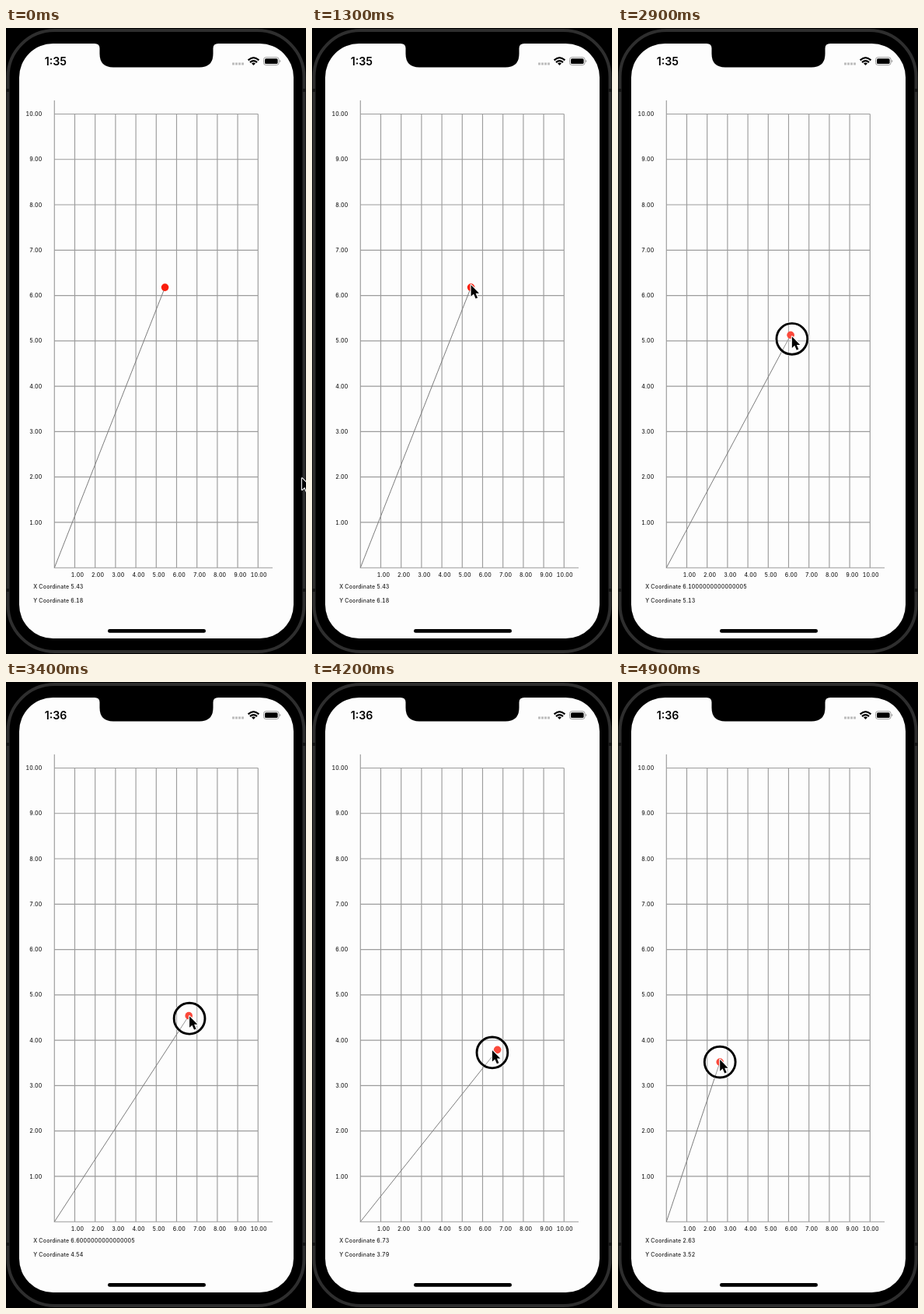
Recreate the animation shown at these times as an HTML page. Size 386x804 px, loop 5 s.

```html
<!DOCTYPE html>
<html lang="en">
<head>
<meta charset="utf-8">
<title>Draggable point</title>
<style>
  html, body { margin: 0; width: 100%; height: 100%; overflow: hidden; background: #000; }
  svg { display: block; width: 100vw; height: 100vh; }
  text { font: 500 7px Inter, Roboto, sans-serif; font-variant-numeric: tabular-nums; letter-spacing: .2px; fill: #1c1c1c; }
  .end { text-anchor: end; }
  #clock { font-size: 14.2px; font-weight: 600; font-variant-numeric: normal; letter-spacing: 0; fill: #000; }
</style>
</head>
<body>
<svg viewBox="0 0 386 804">
  <!-- phone body -->
  <rect width="386" height="804"/>
  <rect x="2.5" y="3" width="381" height="798" rx="60" fill="none" stroke="#2e2e2e" stroke-width="4"/>
  <path d="M0 80h4M382 80h4M0 722h4M382 722h4" stroke="#141414" stroke-width="4"/>
  <rect x="17" y="20" width="353" height="764" rx="43.5" fill="#fdfdfd"/>
  <path d="M114 19.5H273V20Q266.5 20 266.5 26V33Q266.5 50.4 249 50.4H138Q120.5 50.4 120.5 33V26Q120.5 20 114 20Z"/>
  <rect x="131" y="772" width="126" height="4.8" rx="2.4"/>

  <!-- status bar -->
  <text id="clock" x="49.8" y="47.9"></text>
  <path d="M291 46h15" stroke="#bdbdbd" stroke-width="3" stroke-dasharray="3 1"/>
  <g fill="none" stroke="#000" stroke-width="2.2">
    <path d="M311.6 41.4Q318.5 35 325.4 41.4M314 44.1Q318.5 40 323 44.1"/>
    <path d="M316 45.4Q318.5 43.4 321 45.4L318.5 48Z" fill="#000" stroke="none"/>
  </g>
  <rect x="331.5" y="37.7" width="19.6" height="9.8" rx="2.8" fill="none" stroke="#999"/>
  <rect x="333" y="39.2" width="16.6" height="6.8" rx="1.6"/>
  <path d="M352.2 41v3.2q1.2-.4 1.2-1.6t-1.2-1.6" fill="#999"/>

  <path id="grid" fill="none" stroke="#9c9c9c" stroke-width="1.15"/>
  <g id="labels"></g>
  <text id="xText" x="35.2" y="719.6"></text>
  <text id="yText" x="35.2" y="737.8"></text>

  <line id="ray" x1="62.3" y1="693.2" stroke="#7c7c7c"/>
  <circle id="dot" r="4.8" fill="#fa1c0a"/>
  <g id="hand">
    <g id="ring" fill="none">
      <circle r="21" fill="#fff" fill-opacity=".2" stroke="#fff" stroke-width="2"/>
      <circle r="19.9" stroke="#000" stroke-width="2.9"/>
    </g>
    <path d="M0-3V11.6L3.4 8.5L6 14.4L8.5 13.3L6 7.6H10.4Z" stroke="#fff" stroke-width="2.2" stroke-linejoin="round" paint-order="stroke"/>
  </g>
</svg>
<script>
const LOOP = 5000, STEP = 100;
const X0 = 62.3, Y0 = 693.2, UX = 26.2, UY = 58.27;
const PRESS = 2100, MINUTE = 3300, LAG = 60;

// key points [ms, x, y], in hundredths of a grid unit
const approach = [[0, 1216, 192], [450, 500, 630], [1300, 543, 618]];
const drag = [
  [2300, 543, 618], [2900, 610, 513], [3400, 660, 454],
  [4200, 673, 379], [4400, 537, 361], [4900, 263, 352]
];

const $ = id => document.getElementById(id);
const px = u => X0 + u * UX;
const py = u => Y0 - u * UY;

function set(id, attrs) {
  for (const k in attrs) $(id).setAttribute(k, attrs[k]);
}

// smooth curve through the keys, at rest at both ends
function spline(keys, t) {
  const last = keys.length - 1;
  t = Math.min(Math.max(t, keys[0][0]), keys[last][0]);
  const i = Math.max(1, keys.findIndex(k => k[0] >= t));
  const a = keys[i - 1], b = keys[i], h = b[0] - a[0], f = (t - a[0]) / h;
  const slope = (n, j) => n === 0 || n === last ? 0 :
    (keys[n + 1][j] - keys[n - 1][j]) / (keys[n + 1][0] - keys[n - 1][0]);
  return [1, 2].map(j =>
    a[j] + (b[j] - a[j]) * f * f * (3 - 2 * f) +
    h * f * (1 - f) * (slope(i - 1, j) * (1 - f) - slope(i, j) * f));
}

function buildChart() {
  let d = `M${X0} 93V${Y0}H343`, labels = "";
  for (let n = 1; n <= 10; n++) {
    d += `M${px(n)} ${py(10)}V${Y0}M${X0} ${py(n)}H${px(10)}`;
    const s = n.toFixed(2);
    labels += `<text class="end" x="46.6" y="${py(n) + 2.6}">${s}</text>` +
              `<text class="end" x="${74 + 26.17 * n}" y="705.3">${s}</text>`;
  }
  set("grid", { d });
  $("labels").innerHTML = labels;
}

function draw() {
  const t = Math.floor(performance.now() % LOOP / STEP) * STEP;
  const [ux, uy] = spline(drag, t).map(v => Math.round(v) * 0.01);
  // the point trails the hand a little
  const [hx, hy] = t < PRESS ? spline(approach, t) : spline(drag, t + LAG);
  const cx = px(ux), cy = py(uy);

  set("dot", { cx, cy });
  set("ray", { x2: cx, y2: cy });
  set("hand", { transform: `translate(${px(hx / 100)} ${py(hy / 100)})` });
  set("ring", { visibility: t < PRESS ? "hidden" : "visible" });
  $("xText").textContent = "X Coordinate " + ux;
  $("yText").textContent = "Y Coordinate " + uy;
  $("clock").textContent = t < MINUTE ? "1:35" : "1:36";
  requestAnimationFrame(draw);
}

buildChart();
draw();
</script>
</body>
</html>
```
